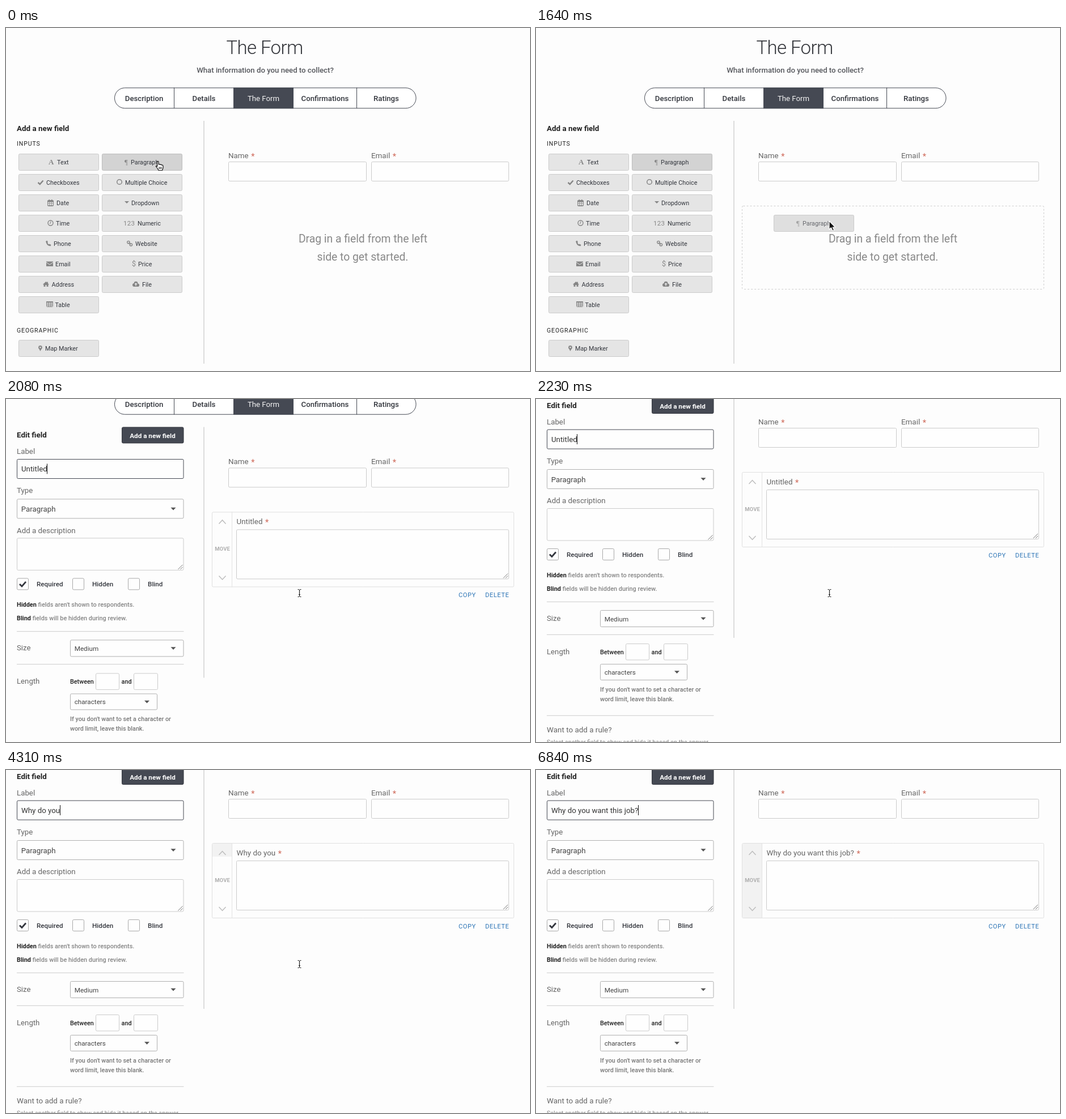
Recreate the animation shown at these times as an HTML page with a canvas. Size 924 px wide and 606 px high, loop 7140 ms.

```html
<!DOCTYPE html>
<html lang="en">
<head>
<meta charset="utf-8">
<title>Form builder</title>
<style>
html, body { margin: 0; width: 100%; height: 100%; overflow: hidden; background: #fdfdfd; }
canvas { display: block; }
</style>
</head>
<body>
<canvas id="stage" width="924" height="606"></canvas>
<script>
const c = document.getElementById('stage').getContext('2d');
const LOOP = 7140;
const BG = '#fdfdfd', DARK = '#454953', INK = '#33363d', GREY = '#666', LINE = '#cbcbcb', ICON = '#868686';
const SANS = 'Roboto, "Liberation Sans", sans-serif';
const SERIF = '"Liberation Serif", serif';
const QUESTION = 'Why do you want this job?';

// [time, number of typed letters]
const TYPING = [
  [2980, 1], [3270, 2], [3570, 3], [3720, 5], [3870, 6], [4020, 8], [4170, 10], [4320, 12],
  [4470, 13], [4610, 15], [4750, 16], [4900, 18], [5050, 20], [5200, 22], [5350, 24], [5800, 25]
];

function text(str, x, y, size, color = GREY, o = {}) {
  c.font = `${o.weight || 400} ${size}px ${o.family || SANS}`;
  c.letterSpacing = (o.space || 0) + 'px';
  c.textAlign = o.align || 'left';
  c.fillStyle = color;
  c.fillText(str, x, y);
  return c.measureText(str).width;
}

function box(x, y, w, h, fill, stroke, r = 2) {
  c.beginPath();
  c.roundRect(x + .5, y + .5, w - 1, h - 1, r);
  if (fill) { c.fillStyle = fill; c.fill(); }
  if (stroke) { c.strokeStyle = stroke; c.lineWidth = 1; c.stroke(); }
}

function path(points, close) {
  c.beginPath();
  for (let i = 0; i < points.length; i += 2) c.lineTo(points[i], points[i + 1]);
  if (close) c.closePath();
}

function line(points, color, width = 1) {
  path(points);
  c.strokeStyle = color;
  c.lineWidth = width;
  c.stroke();
}

function shape(points, color) {
  path(points, true);
  c.fillStyle = color;
  c.fill();
}

function ring(x, y, r, color, width = 1.4) {
  c.beginPath();
  c.arc(x, y, r, 0, 7);
  c.strokeStyle = color;
  c.lineWidth = width;
  c.stroke();
}

function dot(x, y, r, color) {
  c.beginPath();
  c.arc(x, y, r, 0, 7);
  c.fillStyle = color;
  c.fill();
}

function at(x, y, draw) {
  c.save();
  c.translate(x, y);
  draw();
  c.restore();
}

// Icons: origin at the left edge, vertically centred
const icons = {
  text() { text('A', 0, 4, 13, ICON, { family: SERIF, weight: 700 }); },
  check() { line([.5, 0, 3.8, 3, 9.5, -3.5], ICON, 2.4); },
  date() {
    box(0, -5, 11, 11, null, ICON, 1);
    c.fillStyle = ICON;
    c.fillRect(0, -4, 11, 2.5);
    c.fillRect(2.5, -6, 1.5, 3);
    c.fillRect(7, -6, 1.5, 3);
    for (const v of [3.5, 7]) {
      line([v, -2, v, 5], ICON, .8);
      line([0, v - 2.5, 11, v - 2.5], ICON, .8);
    }
  },
  time() {
    ring(5.5, -.5, 4.5, ICON);
    line([5.8, -3.5, 5.8, 0, 3.5, 0], ICON);
  },
  phone() {
    c.beginPath();
    c.moveTo(1.5, -4);
    c.quadraticCurveTo(2, 2.5, 8, 3.2);
    c.strokeStyle = ICON;
    c.lineWidth = 2.2;
    c.stroke();
    shape([0, -4, 2.5, -5.5, 4, -2.5, 2, -1], ICON);
    shape([5, 2, 6.5, .5, 9.5, 2, 8.5, 4.5], ICON);
  },
  email() {
    shape([0, -4.5, 12, -4.5, 12, 4, 0, 4], ICON);
    line([0, -3, 6, 1.2, 12, -3], '#e5e5e5');
  },
  home() {
    shape([0, 0, 5.5, -5, 7.5, -3.2, 7.5, -4.5, 9, -4.5, 9, -1.8, 11, 0, 9.5, .5, 9.5, 4, 6.6, 4, 6.6, 1, 4.4, 1, 4.4, 4, 1.5, 4, 1.5, .5], ICON);
  },
  table() {
    box(0, -6, 12, 10, null, ICON, 1);
    c.fillStyle = ICON;
    c.fillRect(0, -6, 12, 2.3);
    for (const v of [4, 8]) line([v, -5, v, 4], ICON);
    for (const v of [-1.3, 1.3]) line([0, v, 12, v], ICON);
  },
  para() { text('¶', 0, 4, 13, ICON, { family: SERIF }); },
  circle() { ring(5, -1, 4.3, ICON, 1.5); },
  drop() { shape([0, -3, 8, -3, 4, 1], ICON); },
  num() { text('123', 0, 4, 11.5, ICON, { space: .3 }); },
  link() {
    ring(2.9, -2.4, 2.2, ICON);
    ring(7.4, 1.8, 2.2, ICON);
    line([3.5, -1.8, 6.8, 1.2], ICON, 1.5);
  },
  price() { text('$', 0, 4, 12.5, ICON); },
  cloud() {
    dot(3, 1, 3, ICON);
    dot(6, -1.8, 3.4, ICON);
    dot(9.3, 1.2, 2.8, ICON);
    c.fillRect(3, 0, 6.5, 4);
    shape([6, -3, 8.6, 0, 6.8, 0, 6.8, 2.6, 5.2, 2.6, 5.2, 0, 3.4, 0], '#e5e5e5');
  },
  marker() {
    dot(3.5, -1.8, 3.3, ICON);
    shape([.4, -.8, 6.6, -.8, 3.5, 5], ICON);
    dot(3.5, -1.8, 1.2, '#e5e5e5');
  }
};

// icon, icon offset, label, label offset within the button
const LEFT = [
  ['text', 53, 'Text', 68], ['check', 34, 'Checkboxes', 49], ['date', 51, 'Date', 67],
  ['time', 51, 'Time', 66], ['phone', 48, 'Phone', 62], ['email', 49, 'Email', 65],
  ['home', 43, 'Address', 58.5], ['table', 49, 'Table', 64.5]
];
const RIGHT = [
  ['para', 40, 'Paragraph', 51], ['circle', 26, 'Multiple Choice', 41], ['drop', 40, 'Dropdown', 52],
  ['num', 38, 'Numeric', 63], ['link', 44, 'Website', 59], ['price', 53, 'Price', 64],
  ['cloud', 54, 'File', 71]
];
const MARKER = ['marker', 35, 'Map Marker', 47];

function fieldButton(x, y, [icon, ix, label, lx], active) {
  box(x, y, 142, 30, active ? '#d3d3d3' : '#e5e5e5', active ? '#bdbdbd' : LINE);
  at(x + ix, y + 15, icons[icon]);
  text(label, x + lx, y + 19, 10.8, INK);
}

function header(scroll) {
  at(0, -scroll, () => {
    text('The Form', 456, 46, 33, '#33353a', { weight: 300, align: 'center', space: -.6 });
    text('What information do you need to collect?', 457, 79, 13.2, '#55575c', { weight: 500, align: 'center' });
    box(191, 105.3, 532.5, 37, '#fff', DARK, 18);
    c.fillStyle = DARK;
    c.fillRect(401, 105.3, 106, 37);
    for (const x of [296.5, 618.5]) line([x, 105.3, x, 142], DARK);
    const tabs = ['Description', 'Details', 'The Form', 'Confirmations', 'Ratings'];
    [243.5, 349, 454, 562.5, 670.5].forEach((x, i) => {
      const on = i === 2;
      text(tabs[i], x, 128.7, 13.2, on ? '#f4f4f4' : INK, { weight: on ? 400 : 500, align: 'center' });
    });
  });
}

function label(str, x, y) {
  const w = text(str, x, y, 13.4);
  text('*', x + w + 4.5, y + 1.5, 14.5, '#cf6a5a');
}

function contactFields(y) {
  label('Name', 392, y);
  label('Email', 644, y);
  box(392, y + 6, 244, 35, '#fefefe', LINE);
  box(644, y + 6, 243, 35, '#fefefe', LINE);
}

function pickScene(t) {
  header(0);
  line([349, 164, 349, 593], '#ccc', 1.3);
  text('Add a new field', 19, 182, 13.4, '#222', { weight: 700 });
  text('INPUTS', 19, 207.5, 10.5, '#222', { space: .9 });
  LEFT.forEach((b, i) => fieldButton(22, 222 + 36 * i, b));
  RIGHT.forEach((b, i) => fieldButton(169, 222 + 36 * i, b, i === 0));
  text('GEOGRAPHIC', 19, 538, 10.5, '#222', { space: .9 });
  fieldButton(22, 551, MARKER);
  contactFields(230);

  if (t >= 1490) {
    c.setLineDash([3, 3]);
    box(363, 314, 533, 148, null, '#cdcdcd');
    c.setLineDash([]);
  }
  text('Drag in a field from the left', 629.5, 379, 19.3, '#888', { align: 'center' });
  text('side to get started.', 629, 410.5, 19.3, '#888', { align: 'center' });

  if (t < 1340) { hand(t >= 1050); return; }
  const [x, y] = t < 1490 ? [220, 224] : t < 1640 ? [358, 288] : [419, 330];
  c.globalAlpha = .7;
  fieldButton(x, y, RIGHT[0], true);
  c.globalAlpha = 1;
  at(x + 98, y + 11, arrow);
}

function outlined(points, fill, stroke) {
  path(points, true);
  c.lineJoin = 'round';
  c.fillStyle = fill;
  c.strokeStyle = stroke;
  c.lineWidth = 1.2;
  c.fill();
  c.stroke();
}

function hand(closed) {
  at(264, 235, () => {
    const tip = closed ? [2.5, 7, 4, 6] : [2.5, 1.2, 3.7, .3, 5, 1.2];
    outlined([...tip, 5.2, 6, 7, 5.6, 8, 6.4, 9.5, 6.2, 10.5, 7.2, 12, 7, 13, 8.5, 13, 12, 11.5, 16.5, 5, 16.5, 3.5, 13.5, .3, 9.5, 1, 8.4, 2.8, 9.6], '#fff', '#111');
    for (const x of [6, 8, 10]) line([x, 10.5, x, 14], '#111');
  });
}

function arrow() {
  outlined([0, 0, 0, 15, 3.4, 11.8, 6, 17.3, 8.6, 16.2, 6.2, 11, 10.8, 11], '#111', '#fff');
}

function beam(x, y) {
  line([x + .5, y - 5, x + .5, y + 5], '#222', 1.2);
  for (const side of [-1, 1]) {
    const end = y + 6.5 * side, join = y + 5 * side;
    line([x - 2.5, end, x - .5, end, x + .5, join, x + 1.5, end, x + 3.5, end], '#222');
  }
  line([x - 1, y + 2.5, x + 2, y + 2.5], '#222');
}

function area(x, y, w, h) {
  box(x, y, w, h, '#fefefe', LINE);
  const r = x + w - 2, b = y + h - 2;
  line([r - 8, b, r, b - 8], '#777');
  line([r - 4, b, r, b - 4], '#777');
}

function select(x, y, w, h, value, size, baseline) {
  box(x, y, w, h, '#fefefe', '#b0b0b0');
  text(value, x + 7.7, baseline, size, '#444');
  const m = y + h / 2, r = x + w - 14;
  shape([r - 9, m - 2.2, r, m - 2.2, r - 4.5, m + 2.5], '#555');
}

function hint(strong, rest, y) {
  const w = text(strong, 19, y, 10.9, '#222', { weight: 700 });
  text(rest, 19 + w, y, 10.9, '#858585', { weight: 500 });
}

function editPanel(t, typed) {
  text('Edit field', 19, 15.5, 13.4, '#222', { weight: 700 });
  box(204, -3, 109.5, 29, DARK, '#33363e');
  text('Add a new field', 258.5, 16.7, 11.7, '#fff', { weight: 700, align: 'center' });

  text('Label', 19, 45, 13.3);
  box(19, 53.6, 294.5, 35, '#fefefe', DARK);
  const selected = t >= 2830 && t < 2980;
  if (selected) {
    c.fillStyle = '#b3d7fe';
    c.fillRect(27, 62, 47, 18);
  }
  const w = text(typed, 27, 76, 13.3, '#333');
  const blinkOff = t >= 6240 && t < 6840;
  if (!selected && !blinkOff) {
    c.fillStyle = '#111';
    c.fillRect(Math.floor(27 + w), 62, 1, 18);
  }

  text('Type', 19, 114, 13.3);
  select(19, 124, 294.5, 35, 'Paragraph', 13.3, 147);
  text('Add a description', 19, 184.3, 13.3);
  area(19, 193, 294.5, 57.5);

  ['Required', 'Hidden', 'Blind'].forEach((s, i) => {
    box(19 + 98 * i, 264, 21, 21, '#fefefe', '#a9a9a9');
    text(s, 54 + 98 * i, 278.7, 11.7, INK, { weight: 500 });
  });
  line([24, 274.5, 28, 278.5, 35, 270.5], '#33363e', 2.8);

  hint('Hidden', " fields aren't shown to respondents.", 315);
  hint('Blind', ' fields will be hidden during review.', 339);
  for (const y of [358, 416, 559]) line([19, y + .3, 313.5, y + .3], '#ccc');

  text('Size', 19, 391.5, 13.2);
  select(113, 373, 200.5, 30, 'Medium', 11.7, 393);
  text('Length', 19, 450.5, 13.2);
  text('Between', 113, 450.5, 10.8, '#222', { weight: 500 });
  box(158, 432, 42, 29.5, '#fefefe', LINE);
  text('and', 203.5, 450.5, 10.9, '#222', { weight: 500 });
  box(225, 432, 43, 29.5, '#fefefe', LINE);
  select(113, 468, 154, 29, 'characters', 11.7, 487);
  text("If you don't want to set a character or", 113, 516.5, 10.75, '#777', { weight: 500 });
  text('word limit, leave this blank.', 113, 534, 10.75, '#777', { weight: 500 });
  text('Want to add a rule?', 19, 588.5, 13.45);
  text('Select another field to show and hide it based on the answer', 19, 609.5, 10.7, '#858585');
}

function formPane(t, title, slide) {
  contactFields(45);
  box(363, 129, 533, 133, null, slide < 1 ? '#ececec' : '#e0e0e0');
  if (t >= 3270) {
    c.fillStyle = '#f2f2f2';
    c.fillRect(364, 130, 34, t >= 6240 ? 131 : 23);
  }
  const dx = 11 * (slide - 1);
  if (slide < 1) {
    c.fillStyle = BG;
    c.fillRect(362, 130, 3, 131);
  }
  c.globalAlpha = .45 + .55 * slide;
  const mid = 381.5 + dx;
  line([mid - 6, 150, mid, 143.5, mid + 6, 150], '#bdbdbd', 1.5);
  line([mid - 6, 242, mid, 248.5, mid + 6, 242], '#bdbdbd', 1.5);
  text('MOVE', mid, 198, 9.6, '#b0b0b0', { weight: 700, align: 'center' });
  c.globalAlpha = slide;
  line([398.5, 129, 398.5, 262], '#e3e3e3');
  c.globalAlpha = 1;
  label(title, 406.5 + dx, 151);
  area(406 + dx, 160, 481, 88);
  text('COPY', 798, 279.5, 11, '#2a73b5', { space: .65 });
  text('DELETE', 845, 279.5, 11, '#2a73b5', { space: .65 });
}

function editScene(t) {
  const q = t < 2080 ? 0 : t < 2230 ? .6 : 1;
  const scroll = 176 * q;
  const n = TYPING.reduce((v, [time, count]) => t >= time ? count : v, 0);
  const typed = n ? QUESTION.slice(0, n) : 'Untitled';
  const title = t < 3270 ? 'Untitled' : typed;

  header(9 + scroll);
  const end = 598 - scroll;
  line([349, 155 - scroll, 349, end], '#ccc', 1.3);
  at(0, Math.max(0, 158 - scroll), () => editPanel(t, typed));
  at(0, 176 - scroll, () => formPane(t, title.trimEnd(), q ? 1 : 0));
  if (t < 6240) beam(517, 343);
  else if (t < 6390) beam(530, 341);
}

function frame(now) {
  const t = now % LOOP;
  c.fillStyle = BG;
  c.fillRect(0, 0, 924, 606);
  if (t < 1930) pickScene(t);
  else editScene(t);
  requestAnimationFrame(time => frame(Math.max(0, time - start)));
}

const start = performance.now();
frame(0);
</script>
</body>
</html>
```
